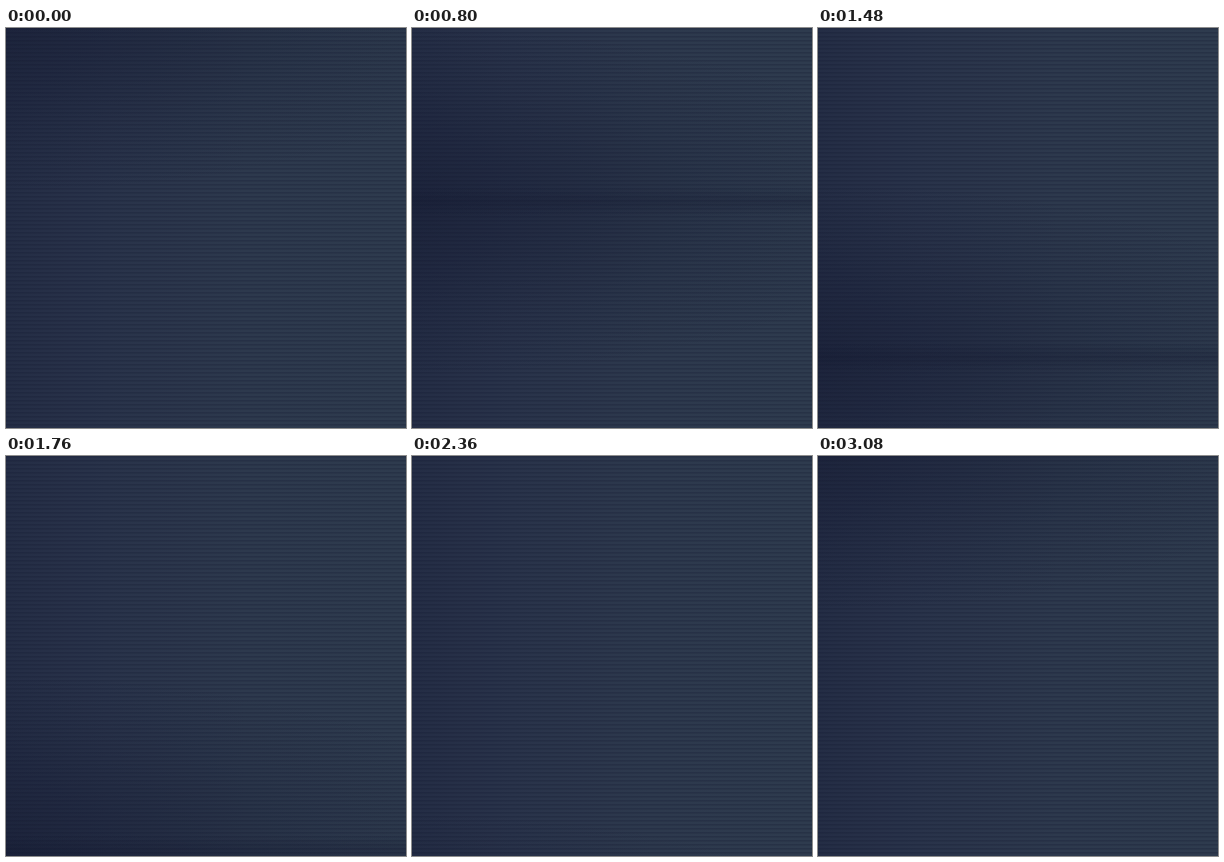
An HTML page with a canvas for the animation above (3120 ms loop, 400 px wide and 400 px high).

```html
<!DOCTYPE html>
<html lang="en">
<head>
<meta charset="utf-8">
<title>Scanlines</title>
<style>
  html, body { margin: 0; width: 100%; height: 100%; overflow: hidden; background: #283348; }
  canvas { display: block; width: 100vw; height: 100vh; }
</style>
</head>
<body>
<canvas id="screen" width="400" height="400"></canvas>
<script>
const SIZE = 400, LOOP = 3120, STEP = 40;
const PITCH = 4, TRAVEL = 715, START = -10;
const ctx = document.getElementById('screen').getContext('2d');

function fade(gradient, stops) {
  stops.forEach(([at, color]) => gradient.addColorStop(at, color));
  return gradient;
}

const ink = alpha => `rgba(18,23,46,${alpha})`;

const base = fade(ctx.createLinearGradient(0, 0, SIZE, 0), [
  [0, '#242d45'], [0.25, '#29334a'], [0.6, '#2d394d'], [1, '#2e3b4e']
]);

// Wide soft shadow, strongest at the left, with a thin dark core.
function band(y) {
  ctx.save();
  ctx.translate(0, y);

  ctx.save();
  ctx.scale(1, 0.34);
  ctx.fillStyle = fade(ctx.createRadialGradient(0, 0, 0, 0, 0, 520), [
    [0, ink(0.42)], [0.3, ink(0.3)], [0.65, ink(0.12)], [1, ink(0)]
  ]);
  ctx.fillRect(0, -520, SIZE, 1040);
  ctx.restore();

  ctx.fillStyle = fade(ctx.createLinearGradient(0, -14, 0, 14), [
    [0, ink(0)], [0.5, ink(0.22)], [1, ink(0)]
  ]);
  ctx.fillRect(0, -14, SIZE, 28);
  ctx.restore();
}

function scanlines() {
  for (let y = 0; y < SIZE; y += PITCH) {
    ctx.fillStyle = ink(0.24);
    ctx.fillRect(0, y, SIZE, 1);
    ctx.fillStyle = ink(0.14);
    ctx.fillRect(0, y + 1, SIZE, 1);
  }
}

function draw(time) {
  const t = Math.floor((time % LOOP) / STEP) * STEP;
  const y = START + TRAVEL * t / LOOP;
  ctx.fillStyle = base;
  ctx.fillRect(0, 0, SIZE, SIZE);
  band(y);
  band(y - TRAVEL);
  scanlines();
}

const began = performance.now();
function tick() {
  draw(performance.now() - began);
  requestAnimationFrame(tick);
}
tick();
</script>
</body>
</html>
```
